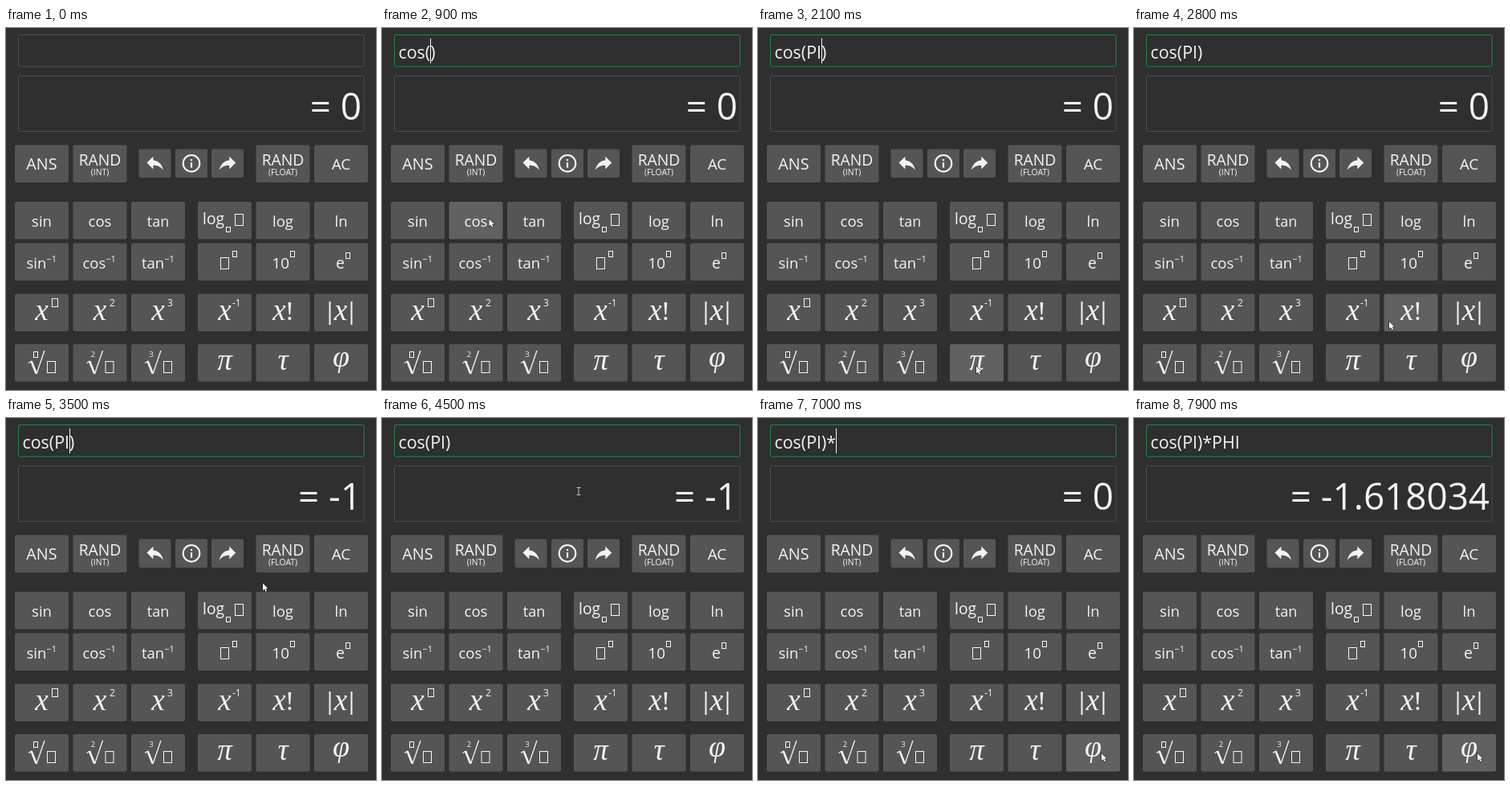
Animation of 461 by 450 pixels, one loop 8 s. Source, as an HTML page with a canvas:

```html
<!DOCTYPE html>
<html lang="en">
<head>
<meta charset="utf-8">
<title>Calculator</title>
<style>
html, body { margin: 0; width: 100%; height: 100%; overflow: hidden; background: #2f2f2f; }
canvas { display: block; width: 461px; height: 450px; }
</style>
</head>
<body>
<canvas id="stage"></canvas>
<script>
const W = 461, H = 450, LOOP = 8000, STEP = 100;
const SANS = '"Open Sans", "Noto Sans", sans-serif';
const MATH = '"Liberation Serif", "Noto Serif", serif';
const INK = '#f4f4f4', FACE = '#555555', HOVER = '#616161', LINE = '#4d4d4d', FOCUS = '#20844b';
const COLS = [11, 83.5, 156, 239, 311.5, 384];
const ROWS = [145.5, 216, 267.5, 330.5, 393];
const BTN_W = 67, BTN_H = 46.5, INPUT_X = 20.5, INPUT_SIZE = 21.4;

const canvas = document.getElementById('stage');
const ctx = canvas.getContext('2d');
const ratio = window.devicePixelRatio || 1;
canvas.width = W * ratio;
canvas.height = H * ratio;

function text(str, x, y, size, align = 'center', font = SANS) {
  ctx.font = `${font === MATH ? 'italic ' : ''}${size}px ${font}`;
  ctx.textAlign = align;
  ctx.fillStyle = INK;
  ctx.fillText(str, x, y);
}

function slot(x, y, w, h) {
  ctx.strokeStyle = INK;
  ctx.lineWidth = 1;
  ctx.strokeRect(x + 0.5, y + 0.5, w, h);
}

function panel(x, y, w, h, color) {
  ctx.strokeStyle = color;
  ctx.lineWidth = 1;
  ctx.beginPath();
  ctx.roundRect(x, y, w, h, 1.5);
  ctx.stroke();
}

function face(x, y, w, h, mouse) {
  const over = mouse && mouse.x >= x && mouse.x <= x + w && mouse.y >= y && mouse.y <= y + h;
  ctx.fillStyle = over ? HOVER : FACE;
  ctx.beginPath();
  ctx.roundRect(x, y, w, h, 2);
  ctx.fill();
}

const word = (str, size = 18.5) => (c, y) => text(str, c, y + 30.5, size);

const rand = kind => (c, y) => {
  text('RAND', c, y + 25, 19.3);
  text(kind, c, y + 37.5, 10.4);
};

const inverse = (str, left) => (c, y) => {
  text(str, c + left, y + 31, 18.5, 'left');
  const end = c + left + ctx.measureText(str).width;
  text('\u22121', end, y + 23.5, 11, 'left');
};

const mathX = (x, y) => text('x', x, y + 32.5, 37, 'center', MATH);

const power = (exp, left) => (c, y) => {
  mathX(c, y);
  text(exp, c + left, y + 15.5, 12, 'left');
};

const root = degree => (c, y) => {
  ctx.strokeStyle = INK;
  ctx.lineJoin = 'miter';
  ctx.lineWidth = 1.3;
  ctx.beginPath();
  ctx.moveTo(c - 16.5, y + 23.5);
  ctx.lineTo(c - 12.5, y + 21);
  ctx.moveTo(c - 6.5, y + 37);
  ctx.lineTo(c + 3.5, y + 8);
  ctx.stroke();
  ctx.lineWidth = 2.6;
  ctx.beginPath();
  ctx.moveTo(c - 13, y + 21);
  ctx.lineTo(c - 6.8, y + 36.5);
  ctx.stroke();
  slot(c + 6.5, y + 21, 10, 14);
  if (degree) text(degree, c - 8.5, y + 16, 9.5);
  else slot(c - 10.5, y + 9, 5, 7);
};

const greek = (ch, size, dy) => (c, y) => text(ch, c, y + dy, size, 'center', MATH);

const KEYS = [
  [word('ANS', 19.8), rand('(INT)'), null, null, rand('(FLOAT)'), word('AC', 19)],
  [word('sin'), word('cos'), word('tan', 18), (c, y) => {
    text('log', c - 27.5, y + 28, 19.3, 'left');
    slot(c + 1.5, y + 31, 5, 6);
    slot(c + 12.5, y + 15, 10, 14);
  }, word('log'), word('ln')],
  [inverse('sin', -19), inverse('cos', -21.5), inverse('tan', -20.5), (c, y) => {
    slot(c - 5.5, y + 17.5, 10, 14);
    slot(c + 9.5, y + 9.5, 5, 7);
  }, (c, y) => {
    text('10', c - 13.5, y + 31, 18.8, 'left');
    slot(c + 9, y + 9.5, 5, 7);
  }, (c, y) => {
    text('e', c - 1, y + 31, 19.5);
    slot(c + 5.5, y + 11.5, 5, 7);
  }],
  [(c, y) => {
    mathX(c, y);
    slot(c + 12.5, y + 5.5, 7, 10);
  }, power('2', 12), power('3', 11.5), power('-1', 9.5), (c, y) => {
    mathX(c - 4.5, y);
    ctx.font = `34px ${MATH}`;
    ctx.fillText('!', c + 8.5, y + 32.5);
  }, (c, y) => {
    mathX(c - 0.5, y);
    ctx.fillRect(c - 15, y + 9.5, 2, 29);
    ctx.fillRect(c + 12, y + 9.5, 2, 29);
  }],
  [root(''), root('2'), root('3'), greek('π', 37, 31.5), greek('τ', 37, 31.5), greek('φ', 38, 27.5)]
];

const ARROW = new Path2D('M10 9V5l-7 7 7 7v-4.1c5 0 8.5 1.6 11 5.1-1-5-4-10-11-11z');

function arrowIcon(cx, flip) {
  ctx.save();
  ctx.translate(cx, 154);
  ctx.scale(flip * 1.13, 1.13);
  ctx.translate(-12, 0);
  ctx.fillStyle = INK;
  ctx.fill(ARROW);
  ctx.restore();
}

function infoIcon(cx, cy) {
  ctx.strokeStyle = ctx.fillStyle = INK;
  ctx.lineWidth = 2.1;
  ctx.beginPath();
  ctx.arc(cx, cy, 10.3, 0, Math.PI * 2);
  ctx.stroke();
  ctx.fillRect(cx - 1.1, cy - 5.3, 2.2, 2.2);
  ctx.fillRect(cx - 1.1, cy - 1.2, 2.2, 6.6);
}

// time, x, y
const PATH = [
  [900, 133.5, 237.5], [1300, 205, 335], [1700, 268, 424], [2000, 272, 420.5],
  [2500, 272, 420.5], [2800, 318, 365], [3100, 342, 280], [3400, 331, 221], [3500, 320, 205.5],
  [3800, 252, 16], [4000, 245, 91], [6500, 245, 91], [6900, 431, 414], [7000, 428, 417]
];

function mouseAt(t) {
  if (t < PATH[0][0]) return null;
  const i = PATH.findIndex(p => p[0] > t);
  if (i < 0) {
    const [, x, y] = PATH[PATH.length - 1];
    return { x, y };
  }
  const [t0, x0, y0] = PATH[i - 1], [t1, x1, y1] = PATH[i];
  const k = (t - t0) / (t1 - t0);
  return { x: x0 + (x1 - x0) * k, y: y0 + (y1 - y0) * k };
}

const inside = (t, spans) => spans.some(([a, b]) => t >= a && t < b);
const latest = (t, list) => list.filter(e => e[0] <= t).pop()[1];

const TYPED = [[0, ''], [900, 'cos()'], [2100, 'cos(PI)'], [5700, 'cos(PI)*'], [7300, 'cos(PI)*PHI']];
const RESULT = [[0, '0'], [3500, '-1'], [5800, '0'], [7400, '-1.618034']];
const CARET = [[0, 0], [900, 4], [2100, 6], [4800, 7], [5700, 8], [7300, 11]];
const CARET_ON = [[900, 1400], [2100, 2600], [3100, 3600], [4000, 4500], [4800, 5400],
  [5800, 6400], [6900, 7200], [7400, 7900]];
const BLURRED = [[0, 900], [1900, 2100], [7200, 7300]];

function pointer({ x, y }) {
  if (y > 8 && y < 129) {
    ctx.fillStyle = '#c4c4c4';
    ctx.fillRect(x - 0.5, y - 4.5, 1, 9);
    ctx.fillRect(x - 2.5, y - 5, 5, 1);
    ctx.fillRect(x - 2.5, y + 4, 5, 1);
    return;
  }
  ctx.save();
  ctx.translate(x, y);
  ctx.scale(0.56, 0.56);
  ctx.beginPath();
  [[0, 0], [0, 16], [3.7, 12.5], [6.3, 18.3], [9, 17.1], [6.5, 11.5], [11.5, 11.5]]
    .forEach(p => ctx.lineTo(...p));
  ctx.closePath();
  ctx.lineWidth = 2;
  ctx.strokeStyle = '#1c1c1c';
  ctx.stroke();
  ctx.fillStyle = '#fff';
  ctx.fill();
  ctx.restore();
}

function draw(t) {
  const mouse = mouseAt(t);
  ctx.setTransform(ratio, 0, 0, ratio, 0, 0);
  ctx.fillStyle = '#2f2f2f';
  ctx.fillRect(0, 0, W, H);

  panel(15.5, 8.5, 430.5, 39.5, inside(t, BLURRED) ? LINE : FOCUS);
  panel(15.5, 59.5, 430.5, 69, LINE);

  const typed = latest(t, TYPED);
  text(typed, INPUT_X, 37.5, INPUT_SIZE, 'left');
  if (inside(t, CARET_ON)) {
    const x = INPUT_X + ctx.measureText(typed.slice(0, latest(t, CARET))).width;
    ctx.fillRect(Math.round(x), 13, 1, 31);
  }
  text('= ' + latest(t, RESULT), 443, 113.5, 45.8, 'right');

  KEYS.forEach((row, r) => row.forEach((label, c) => {
    if (!label) return;
    face(COLS[c], ROWS[r], BTN_W, BTN_H, mouse);
    label(COLS[c] + BTN_W / 2, ROWS[r]);
  }));

  [165.5, 211, 256].forEach(x => face(x, 150.5, 40, 35.5, mouse));
  arrowIcon(185.7, 1);
  infoIcon(231, 168.3);
  arrowIcon(276, -1);

  if (mouse) pointer(mouse);
}

const start = performance.now();
function tick() {
  const t = (performance.now() - start) % LOOP;
  draw(Math.floor(t / STEP) * STEP);
  requestAnimationFrame(tick);
}
tick();
</script>
</body>
</html>
```
